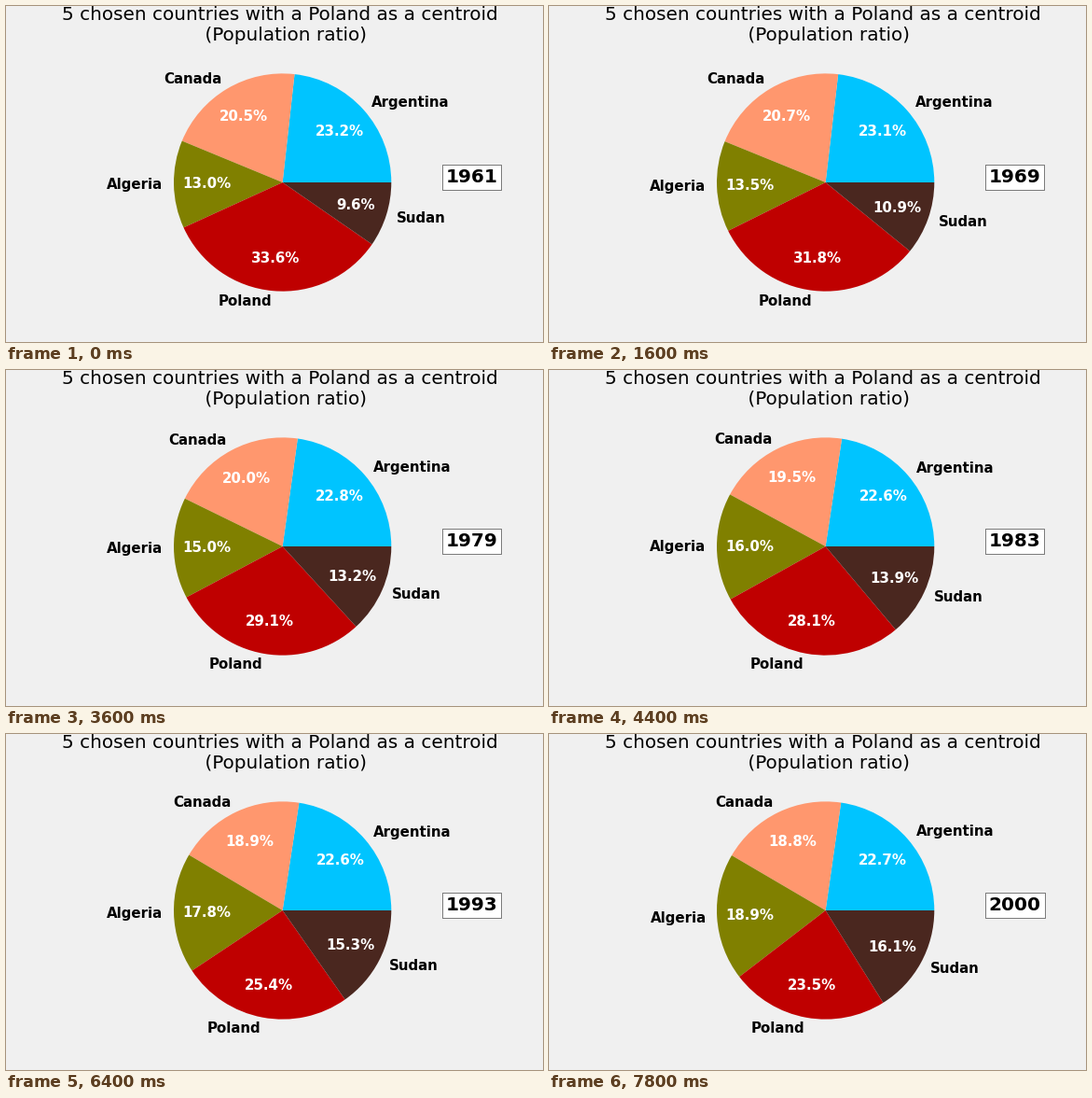
A matplotlib script for the animation above (8000 ms loop, 576x360 px).

```python
import numpy as np
import matplotlib.pyplot as plt
from matplotlib.animation import FuncAnimation

FIRST_YEAR, LAST_YEAR = 1961, 2000
BACKGROUND = "#f0f0f0"
TITLE = "5 chosen countries with a Poland as a centroid \n (Population ratio)"
COLORS = {
    "Argentina": "#00c4ff",
    "Canada": "#ff976e",
    "Algeria": "#808000",
    "Poland": "#bf0000",
    "Sudan": "#4a271f",
}

# Percent of the total at a few turning points; Poland takes the rest
TURNS = [1961, 1973, 1979, 1987, 2000]
SHARES = {
    "Argentina": [23.24, 23.1, 22.78, 22.44, 22.73],
    "Canada": [20.54, 20.8, 19.98, 18.98, 18.84],
    "Algeria": [13.03, 13.7, 14.98, 16.97, 18.86],
    "Sudan": [9.62, 11.5, 13.18, 14.53, 16.11],
}

plt.rcParams["font.family"] = "DejaVu Sans"
fig, ax = plt.subplots(figsize=(8, 5), dpi=72, facecolor=BACKGROUND)
fig.subplots_adjust(left=0.08, right=0.95, bottom=0.07, top=0.88)


def shares_in(year):
    parts = {name: np.interp(year, TURNS, s) for name, s in SHARES.items()}
    parts["Poland"] = 100 - sum(parts.values())
    return [parts[name] for name in COLORS]


def draw(frame):
    year = FIRST_YEAR + frame
    ax.clear()
    _, _, percents = ax.pie(
        shares_in(year),
        labels=list(COLORS),
        colors=list(COLORS.values()),
        autopct="%1.1f%%",
        pctdistance=0.7,
        textprops={"fontsize": 15, "fontweight": "bold", "color": "black"},
    )
    plt.setp(percents, color="white")
    ax.set_title(TITLE, fontsize=20, pad=6, color="black")
    ax.text(1.5, 0, str(year), fontsize=20, fontweight="bold",
            bbox={"facecolor": "white", "edgecolor": "black", "linewidth": 0.5})


anim = FuncAnimation(fig, draw, frames=LAST_YEAR - FIRST_YEAR + 1,
                     interval=200, repeat=True, repeat_delay=0)
plt.show()
```
